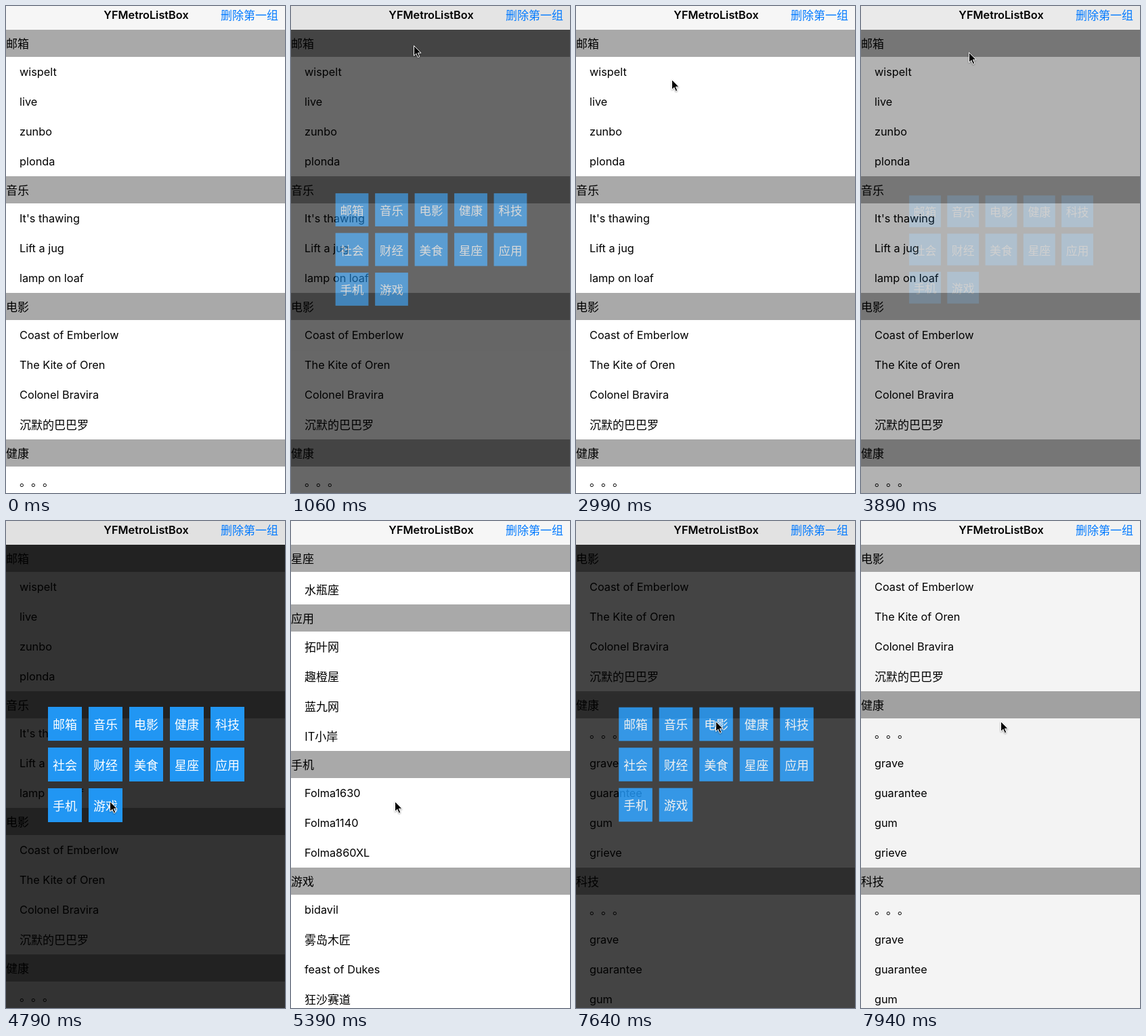
Recreate the animation shown at these times as an HTML page. Size 412x718 px, loop 8 s.

```html
<!DOCTYPE html>
<html lang="zh-CN">
<head>
<meta charset="utf-8">
<title>YFMetroListBox</title>
<style>
  html, body { margin: 0; width: 100%; height: 100%; overflow: hidden; background: #fff; }
  #stage {
    position: relative; width: 412px; height: 718px; overflow: hidden; background: #fff;
    font: 17px "Noto Sans CJK SC", "Noto Sans CJK", sans-serif; color: #000; white-space: nowrap;
    text-spacing-trim: space-all; font-feature-settings: "chws" 0, "halt" 0;
  }
  .latin { font-family: Inter, sans-serif; font-size: 16.3px; }
  #list { position: absolute; top: 35px; left: 0; width: 100%; }
  .head { height: 40px; line-height: 40px; background: #a9a9a9; }
  .row { height: 44px; line-height: 44px; padding-left: 20px; }
  .gap { margin-top: 4px; }
  #veil { position: absolute; inset: 0; background: rgba(0, 0, 0, .8); }
  #grid {
    position: absolute; left: 62px; top: 274px;
    display: grid; grid-template-columns: repeat(5, 50px); gap: 10px;
  }
  .tile {
    height: 50px; line-height: 50px; background: #2196f3;
    color: #fff; font-size: 18px; text-align: center;
  }
  #nav { position: absolute; left: 0; top: 0; width: 100%; height: 35px; line-height: 26px; }
  #nav b { position: absolute; left: 1px; width: 100%; text-align: center; font-weight: 600; }
  #nav span { position: absolute; right: 10px; color: #007aff; }
  #cursor {
    position: absolute; left: 0; top: 0; overflow: visible;
    filter: drop-shadow(0 1px 1px rgba(0, 0, 0, .35));
  }
</style>
</head>
<body>
<div id="stage">
  <div id="list"></div>
  <div id="veil"><div id="grid"></div></div>
  <div id="nav"><b class="latin">YFMetroListBox</b><span>删除第一组</span></div>
  <svg id="cursor" width="13" height="20">
    <path d="M.5 .5V15.3L3.9 12.1L6.3 17.7L8.8 16.6L6.4 11.2H11Z" fill="#000" stroke="#fff"/>
  </svg>
</div>
<script>
const LOOP = 8000, STEP = 150, FADE = 348;
const words = ['。。。', 'grave', 'guarantee', 'gum', 'grieve'];
const sections = [
  ['邮箱', 'wispelt', 'live', 'zunbo', 'plonda'],
  ['音乐', "It's thawing", 'Lift a jug', 'lamp on loaf'],
  ['电影', 'Coast of Emberlow', 'The Kite of Oren', 'Colonel Bravira', '沉默的巴巴罗'],
  ['健康', ...words],
  ['科技', ...words],
  ['星座', '水瓶座'],
  ['应用', '拓叶网', '趣橙屋', '蓝九网', 'IT小岸'],
  ['手机', 'Folma1630', 'Folma1140', 'Folma860XL'],
  ['游戏', 'bidavil', '雾岛木匠', 'feast of Dukes', '狂沙赛道']
];
const tiles = '邮箱 音乐 电影 健康 科技 社会 财经 美食 星座 应用 手机 游戏'.split(' ');

// Menu opens and closes; the list jumps to a section on closing.
const menus = [
  { open: 790, close: 2538, to: 0 },
  { open: 3759, close: 5040, to: 5 },
  { open: 6352, close: 7611, to: 2 }
];
// Pointer path: time, x, y
const path = [
  [290, 272, 73], [600, 181, 58], [1200, 181, 58], [1940, 93, 292],
  [2690, 93, 292], [3140, 158, 43], [3290, 158, 43], [3440, 158, 52],
  [3740, 158, 52], [3890, 159, 68], [4040, 159, 68], [4790, 153, 413],
  [5390, 153, 413], [5990, 80, 142], [6440, 80, 142], [7340, 206, 295]
];

const $ = id => document.getElementById(id);
const list = $('list'), veil = $('veil'), grid = $('grid'), nav = $('nav'), cursor = $('cursor');
const clamp = v => Math.min(1, Math.max(0, v));

function add(parent, cls, text) {
  const el = document.createElement('div');
  el.className = cls;
  el.textContent = text;
  parent.append(el);
  return el;
}

const heads = sections.map(([title, ...rows]) => {
  const head = add(list, 'head', title);
  rows.forEach(text => {
    const row = add(list, /^[\x20-\x7e]+$/.test(text) ? 'row latin' : 'row', text);
    if (title === '星座') row.classList.add('gap');
  });
  return head;
});
tiles.forEach(text => add(grid, 'tile', text));

function pointer(t) {
  const i = path.findIndex(p => p[0] > t);
  if (i < 0) return path[path.length - 1].slice(1);
  if (i === 0) return null;
  const [t0, x0, y0] = path[i - 1], [t1, x1, y1] = path[i];
  const k = (t - t0) / (t1 - t0), e = k * k * (3 - 2 * k);
  return [x0 + (x1 - x0) * e, y0 + (y1 - y0) * e];
}

function draw(t) {
  let a = 0, top = 0;
  for (const m of menus) {
    a += clamp((t - m.open) / FADE) - clamp((t - m.close) / FADE);
    if (t >= m.close) top = m.to;
  }
  list.style.transform = `translateY(${-heads[top].offsetTop}px)`;
  veil.style.opacity = grid.style.opacity = a;
  grid.style.transform = `scale(${.9 + .1 * a})`;
  const grey = Math.round(246 - 21 * Math.pow(clamp(a), .6));
  nav.style.background = `rgb(${grey},${grey},${grey})`;
  const p = pointer(t);
  cursor.style.visibility = p ? 'visible' : 'hidden';
  if (p) cursor.style.transform = `translate(${Math.round(p[0])}px,${Math.round(p[1])}px)`;
}

const start = performance.now();
function tick() {
  const t = (performance.now() - start) % LOOP;
  // The picture is held between coarse time steps.
  const lag = t < 1600 ? 0 : 10;
  draw(Math.floor((t + lag) / STEP) * STEP - lag);
  requestAnimationFrame(tick);
}
tick();
</script>
</body>
</html>
```
